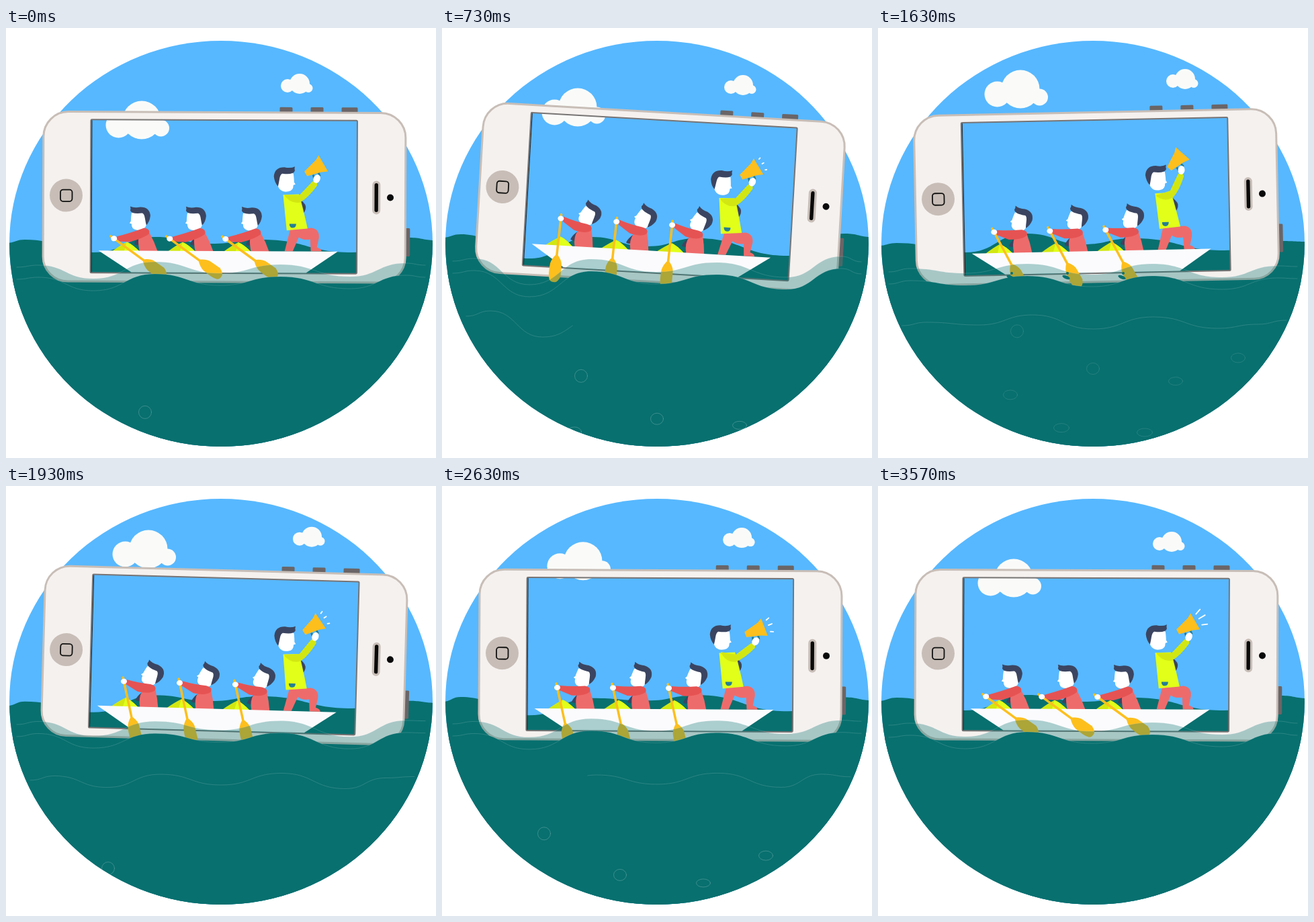
These frames come from a looping animation (640 by 640 pixels, 3.61 s). An HTML page with a canvas:

```html
<!DOCTYPE html>
<html lang="en">
<head>
<meta charset="utf-8">
<title>Rowing phone</title>
<style>
html, body { margin: 0; width: 100%; height: 100%; overflow: hidden; background: #fff; }
canvas { display: block; width: 640px; height: 640px; }
</style>
</head>
<body>
<canvas id="stage" width="640" height="640"></canvas>
<script>
const ctx = document.getElementById('stage').getContext('2d');
const LOOP = 3610;
const TIMES = [0, 730, 1270, 1630, 2230, 3070, 3570];
const SEA = '#08706f', SKY = '#57b8ff', HAIR = '#3b4561', CORAL = '#ee6b6b', RED = '#e65353';
const LIME = '#e1ff19', OLIVE = '#d2e712', GOLD = '#fdbf1c', TAUPE = '#c8beb7', GREY = '#6a6567';
const FAINT = 'rgba(255,255,255,0.14)';
let now = 0;

// Smooth interpolation without overshoot; six values wrap round to the first.
function key(values) {
  const v = values.length === 6 ? [...values, values[0]] : values;
  const t = Math.min(now, TIMES[6]);
  let i = 0;
  while (i < 5 && t > TIMES[i + 1]) i++;
  const rate = k => {
    k = (k + 6) % 6;
    return (v[k + 1] - v[k]) / (TIMES[k + 1] - TIMES[k]);
  };
  const slope = k => {
    const a = rate(k - 1), b = rate(k);
    return a * b <= 0 ? 0 : 2 * a * b / (a + b);
  };
  const span = TIMES[i + 1] - TIMES[i], u = (t - TIMES[i]) / span, w = 1 - u;
  return v[i] * w * w * (1 + 2 * u) + v[i + 1] * u * u * (3 - 2 * u)
    + span * u * w * (slope(i) * w - slope(i + 1) * u);
}

// Each row: x, then the height at the key times.
const BACK = [
  [0, 320, 312, 318, 324, 329, 312],
  [28, 315, 307, 312, 320, 321, 306],
  [130, 334, 343, 338, 334, 340, 342],
  [222, 311, 311, 305, 306, 316, 315],
  [305, 321, 325, 324, 322, 319, 320],
  [380, 315, 313, 315, 313, 313, 309],
  [515, 334, 339, 328, 331, 331, 340],
  [600, 312, 306, 307, 317, 321, 307],
  [640, 316, 311, 315, 318, 326, 311]
];
const FRONT = [
  [16, 374, 365, 380, 381, 365, 380],
  [48, 371, 361, 376, 376, 361, 377],
  [130, 391, 400, 387, 383, 397, 386],
  [222, 366, 362, 362, 369, 367, 362],
  [318, 383, 381, 388, 385, 379, 386],
  [408, 370, 367, 369, 369, 366, 369],
  [512, 388, 389, 379, 389, 392, 381],
  [595, 368, 358, 371, 372, 362, 372],
  [624, 371, 366, 374, 373, 363, 374]
];
const DEEP = [
  [36, 433, 429, 436, 443, 433, 433],
  [72, 425, 421, 434, 438, 425, 425],
  [150, 455, 460, 452, 442, 455, 455],
  [230, 430, 432, 421, 427, 430, 430],
  [320, 445, 445, 450, 448, 443, 445],
  [410, 428, 428, 429, 430, 425, 430],
  [505, 450, 450, 448, 447, 454, 442],
  [565, 430, 430, 430, 441, 428, 430],
  [608, 433, 433, 434, 435, 430, 436]
];
// Items: x, y at the middle time, speed, radii, first moment
const BUBBLES = [
  { middle: 1270, end: 1790, fade: 290, items: [
    [207, 478, .074, 9.5, 9.5, 0], [320, 537, .083, 9.5, 8.5, 0], [443, 552, .073, 10.5, 6, 0],
    [536, 513, .061, 10.5, 7, 1000], [197, 568, .061, 10.5, 7, 600], [273, 615, .055, 11.5, 6.5, 600],
    [397, 624, .061, 11.5, 6, 600]] },
  { middle: 2230, end: 3560, fade: 300, items: [
    [152, 547, .074, 9.5, 9.5, 1790], [265, 613, .085, 9.5, 8.5, 1790],
    [389, 619, .07, 10.5, 6, 1790], [482, 577, .067, 10.5, 7, 1790]] }
];

function fill(d, color) {
  ctx.fillStyle = color;
  ctx.fill(new Path2D(d));
}
function stroke(d, color, width, cap = 'round') {
  ctx.strokeStyle = color;
  ctx.lineWidth = width;
  ctx.lineCap = cap;
  ctx.stroke(new Path2D(d));
}
function dot(x, y, rx, color, ry = rx, turn = 0) {
  ctx.fillStyle = color;
  ctx.beginPath();
  ctx.ellipse(x, y, rx, ry, turn, 0, 7);
  ctx.fill();
}
function box(x, y, w, h, r, color) {
  ctx.fillStyle = color;
  ctx.beginPath();
  ctx.roundRect(x, y, w, h, r);
  ctx.fill();
}
function group(x, y, degrees, draw, sx = 1, sy = 1) {
  ctx.save();
  ctx.translate(x, y);
  ctx.rotate(degrees * Math.PI / 180);
  ctx.scale(sx, sy);
  draw();
  ctx.restore();
}

function crest(rows, lift = 0) {
  const pts = rows.map(([x, ...ys]) => [x, key(ys) - lift]);
  return pts.map(([x, y], i) => {
    if (!i) return `M${x},${y}`;
    const [px, py] = pts[i - 1], mid = (x + px) / 2;
    return `C${mid},${py} ${mid},${y} ${x},${y}`;
  }).join('');
}
const sea = (line, color) => fill(line + 'H640V640H0V' + line.match(/,([\d.]+)/)[1] + 'Z', color);

function inDisc(draw) {
  ctx.save();
  ctx.beginPath();
  ctx.ellipse(320, 321, 315, 302, 0, 0, 7);
  ctx.clip();
  draw();
  ctx.restore();
}

function clouds() {
  const white = '#fafbf9';
  group(key([202, 202, 206, 212, 212, 206]), key([137, 118, 100, 91, 100, 126]), 0, () => {
    dot(0, 0, 28.5, white);
    dot(-34.5, 7.5, 19, white);
    dot(28.5, 12, 12.5, white);
  });
  group(key([437, 448, 458, 457, 452, 440]), key([83, 85, 82, 76, 75.5, 80]), 0, () => {
    dot(0, 0, 15, white);
    dot(-18, 3, 10, white);
    dot(13, 6.5, 6.5, white);
  });
}

function phone() {
  for (const [x, w] of [[407, 19], [453, 19], [499, 24]]) box(x, 117.5, w, 9, 1.5, GREY);
  box(592, 297, 9.5, 42, 1.5, GREY);
  const body = new Path2D();
  body.roundRect(55.5, 125.5, 539, 252.5, 37);
  const frame = new Path2D(body);
  frame.rect(126.5, 137, 396, 228);
  ctx.fillStyle = '#f5f1ef';
  ctx.fill(frame, 'evenodd');
  ctx.strokeStyle = TAUPE;
  ctx.lineWidth = 3;
  ctx.stroke(body);
  ctx.strokeStyle = '#777474';
  ctx.lineWidth = 2;
  ctx.beginPath();
  ctx.roundRect(126, 137, 396.5, 228, 1.5);
  ctx.stroke();
  stroke('M127.5,138V364', '#222', 1, 'butt');
  dot(89.5, 250, 24.5, TAUPE);
  ctx.strokeStyle = '#111';
  ctx.lineWidth = 1.8;
  ctx.beginPath();
  ctx.roundRect(81, 241.5, 17.5, 17.5, 4);
  ctx.stroke();
  box(545.2, 226.5, 12, 50, 6, TAUPE);
  box(548.5, 230, 5.4, 43, 2.7, '#0a0a0a');
  dot(572, 251.5, 5, '#0a0a0a');
}

// Drawn around the neck, facing left.
function head() {
  fill('M-17,-28 Q-18,-20 -18,-16 L-20,-13 L-17,-12 Q-17,-4 -10,-3 Q0,-1 4,-8 Q9,-16 4,-27 Q-2,-35 -17,-28Z', '#fff');
  fill('M-19,-38 Q-13,-35 -4,-37 Q10,-37 11,-24 Q10,-15 5,-10 Q4,-14 3,-20 Q2,-27 -1,-28 Q-17,-26 -19,-32 Q-18,-35 -19,-38Z', HAIR);
}

function rowerBody(lean) {
  const d = 12 * lean;
  fill('M158,333 Q170,324 180,319 Q188,322 199,333Z', OLIVE);
  fill('M180,319 Q188,322 199,333 H176Z', LIME);
  const tx = 195 + 4 * lean;
  fill(`M${tx + 6},310 Q${tx - 1},315 ${tx - 4},322 Q${tx + 2},326 ${tx + 8},320Z`, HAIR);
  fill(`M${199 + 3 * lean},333 Q${196 + 3 * lean},318 ${198 + .6 * d},309 Q${205 + d},301 ${213 + d},304
    Q${221 + .6 * d},318 ${226 + 3 * lean},333Z`, CORAL);
  group(204 + d, 304, 29 * lean, head);
}

function rowerArm(lean, angle) {
  const hx = 161 + 18 * lean, hy = 314 - 22 * lean, sx = 208 + 12 * lean, sy = 304;
  const mx = (hx + sx) / 2, my = (hy + sy) / 2 + 5;
  fill(`M${hx + 4},${hy - 3} Q${mx},${my - 8} ${sx - 2},${sy - 6} Q${sx + 8},${sy - 4} ${sx + 5},${sy + 3}
    Q${sx - 2},${sy + 9} ${mx},${my + 5} L${hx + 3},${hy + 4}Z`, RED);
  group(hx, hy, angle, () => {
    stroke('M-6,0H60', GOLD, 3.5);
    fill('M55,-2 Q62,-8 68,-8.5 L86,-9 Q94,-6 95,-2 Q96,5 92,7 Q86,10 68,8.5 Q61,7 55,2Z', GOLD);
  });
  dot(hx, hy, 4.5, '#fff', 4);
}

function captain() {
  fill('M423,300 L455,297 Q467,299 466,312 L463,326 Q470,328 470,332 H454 L453,314 Q443,316 436,311 L427,332 H415Z', CORAL);
  fill('M438,255 Q448,262 446,269 Q444,276 440,276Z', HAIR);
  fill('M412.5,248 L436,247 Q441,262 449,298 L418,301Z', LIME);
  fill('M422,291 H432 Q432,297 427,297 Q422,297 422,291Z', '#267f91');
  group(410, 246, 0, head, -1.04, 1.06);

  const swing = key([0, -4, 1, -17, 7, 10]);
  const burst = key([0, .25, 1, 0, .7, .3, 1]);
  group(424, 253, swing, () => {
    ctx.translate(-424, -253);
    fill('M414,248 L437,248 L456,228 Q464,226 463,234 Q450,252 438,259 Q423,262 414,248Z', OLIVE);
    stroke('M457,218 L459,224 M465,215 L467,220', '#267f91', 3, 'butt');
    fill('M465,189 L479,213 L469,214 L448,220 L444,213 L461,196Z', GOLD);
    dot(462.5, 224, 5, '#fff', 6.5, .4);
    if (burst > .02) {
      for (const [x, y, dx, dy] of [[473, 190, 6, -7], [477.5, 197, 9, -5.5], [482, 206, 8, -1]])
        stroke(`M${x},${y}l${dx * burst},${dy * burst}`, '#fff', 1.8);
    }
  });
}

function crew() {
  const lean = key([0, 1, .1, .6, 1, .08]);
  const angle = key([36, 93, 39, 63, 83, 64]);
  const each = draw => [0, 83, 166].forEach(x => group(x, 0, 0, draw));
  each(() => rowerBody(lean));
  captain();
  fill('M138,332 H494 L447,364 H187Z', '#fbfbfd');
  each(() => rowerArm(lean, angle));
}

function splashes() {
  if (Math.abs(now - 1630) < 60) {
    for (const x of [197, 280, 363]) {
      dot(x, 371, 6, SEA, 2.5, .4);
      dot(x + 2, 365, 2, SEA);
    }
  }
  if (Math.abs(now - 3070) < 60) {
    dot(275, 375, 2.5, SEA);
    fill('M291,381 Q297,366 316,367 Q314,377 291,381Z', SEA);
    fill('M375,371 Q383,353 402,353 Q402,365 375,371Z', '#a7c6c6');
  }
}

function bubbles() {
  for (const { middle, end, fade, items } of BUBBLES) {
    ctx.globalAlpha = Math.max(0, Math.min(1, (end - now) / fade));
    for (const [x, y, speed, rx, ry, start] of items) {
      if (now < start) continue;
      ctx.beginPath();
      ctx.ellipse(x, y + (middle - now) * speed, rx, ry, 0, 0, 7);
      ctx.strokeStyle = 'rgba(255,255,255,0.2)';
      ctx.lineWidth = 1;
      ctx.stroke();
    }
  }
  ctx.globalAlpha = 1;
}

function deepLine() {
  const from = 34 + Math.max(0, now - 2230) * .455;
  const to = 36 + (now - 430) * .527;
  if (to <= from || from > 610) return;
  ctx.save();
  ctx.beginPath();
  ctx.rect(from, 400, to - from, 80);
  ctx.clip();
  stroke(crest(DEEP), FAINT, 1);
  ctx.restore();
}

function draw() {
  ctx.fillStyle = '#fff';
  ctx.fillRect(0, 0, 640, 640);
  dot(320, 321, 315, SKY, 302);
  inDisc(() => {
    clouds();
    sea(crest(BACK), SEA);
  });
  group(324, 251, key([.22, 3.3, -3.33, -1.15, 3.3, -3.1]), () => {
    ctx.translate(-324, -251);
    phone();
    crew();
  });
  inDisc(() => {
    const veil = crest(FRONT, 18), front = crest(FRONT);
    sea(veil, 'rgba(8,112,111,0.33)');
    stroke(veil, FAINT, 1);
    sea(front, SEA);
    stroke(front, FAINT, 1);
    splashes();
    deepLine();
    bubbles();
  });
}

function tick() {
  now = performance.now() % LOOP;
  draw();
  requestAnimationFrame(tick);
}
tick();
</script>
</body>
</html>
```
